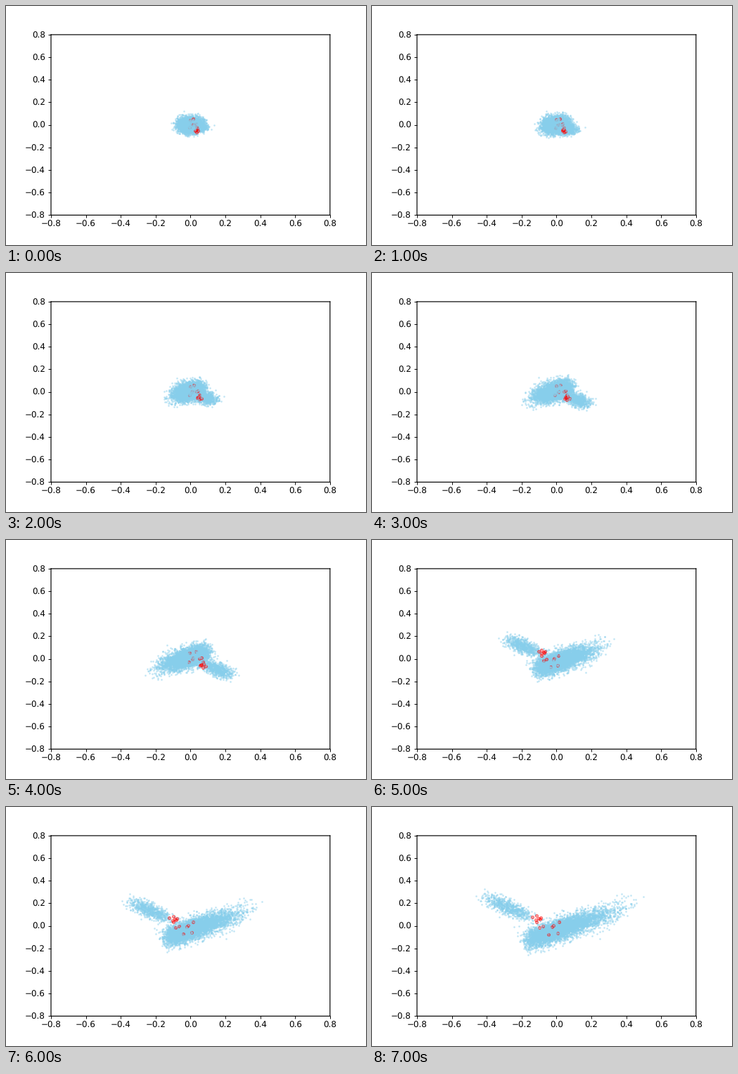
These frames come from a looping animation (512 px wide and 341 px high, 8 s). A matplotlib script:

```python
import numpy as np
import matplotlib.pyplot as plt
from matplotlib.animation import FuncAnimation

FRAMES, INTERVAL = 8, 1000
N_MAIN, N_SIDE = 5000, 700
N_TOP = 250  # blue dots lying over the red ones
FLIP_FRAME = 5  # both axes change sign from here on
DPI = 256 / 3

plt.rcParams.update({"font.family": "DejaVu Sans", "text.hinting": "none"})
rng = np.random.default_rng(7)

# Final shape: a long main lobe and a short side lobe, forming a V
main_x = 0.74 * rng.beta(1.9, 4.8, N_MAIN) - 0.18
side_x = -0.14 - 0.31 * rng.beta(2, 2.6, N_SIDE)
main = np.column_stack([main_x, 0.53 * main_x - 0.04])
side = np.column_stack([side_x, -0.66 * side_x - 0.017])
main_noise = rng.normal(size=(N_MAIN, 2))
side_noise = rng.normal(size=(N_SIDE, 2)) * [1, 0.7]
order = rng.permutation(N_MAIN + N_SIDE)

# Final places of the red points
RED = np.array([
    (0.006, -0.065), (-0.046, -0.077), (-0.026, -0.009), (-0.018, 0.004),
    (0.015, 0.035), (-0.078, -0.002), (-0.098, -0.015), (-0.115, 0.035),
    (-0.119, 0.053), (-0.139, 0.078), (-0.115, 0.091), (-0.102, 0.066),
    (-0.090, 0.072), (-0.094, 0.060),
])


def growth(i):
    return 0.08 + 0.07 * i + 0.009 * i ** 2


def sign(i):
    return 1 if i >= FLIP_FRAME else -1


def cloud(i):
    t, g = i / (FRAMES - 1), growth(i)
    spread = np.array([0.031 - 0.012 * t, 0.030 + 0.016 * t])
    pts = np.vstack([main * g + main_noise * spread,
                     side * g ** 0.85 + side_noise * spread])
    return sign(i) * pts[order]


def red_points(i):
    g = growth(i)
    return sign(i) * RED * [0.25 + 0.75 * g, 0.65 + 0.35 * g]


fig = plt.figure(figsize=(6, 341 / DPI), dpi=DPI, facecolor="white")
ax = fig.add_axes([0.125, 0.125, 0.775, 0.755])
ticks = np.linspace(-0.8, 0.8, 9)
ax.set(xlim=(-0.8, 0.8), ylim=(-0.8, 0.8), xticks=ticks, yticks=ticks)
ax.tick_params(labelsize=10)
ax.tick_params(axis="x", pad=2.7)
for spine in ax.spines.values():
    spine.set(linewidth=1, snap=False)

blue = dict(s=5, c="skyblue", alpha=0.5, linewidths=0)
below = ax.scatter([], [], zorder=1, **blue)
red = ax.scatter([], [], s=11, facecolors=(1, 0, 0, 0.3),
                 edgecolors=(1, 0, 0, 0.5), linewidths=1, zorder=2)
above = ax.scatter([], [], zorder=3, **blue)


def update(i):
    pts = cloud(i)
    below.set_offsets(pts[N_TOP:])
    above.set_offsets(pts[:N_TOP])
    red.set_offsets(red_points(i))
    return below, red, above


anim = FuncAnimation(fig, update, frames=FRAMES, interval=INTERVAL,
                     repeat=True, repeat_delay=0)
plt.show()
```
